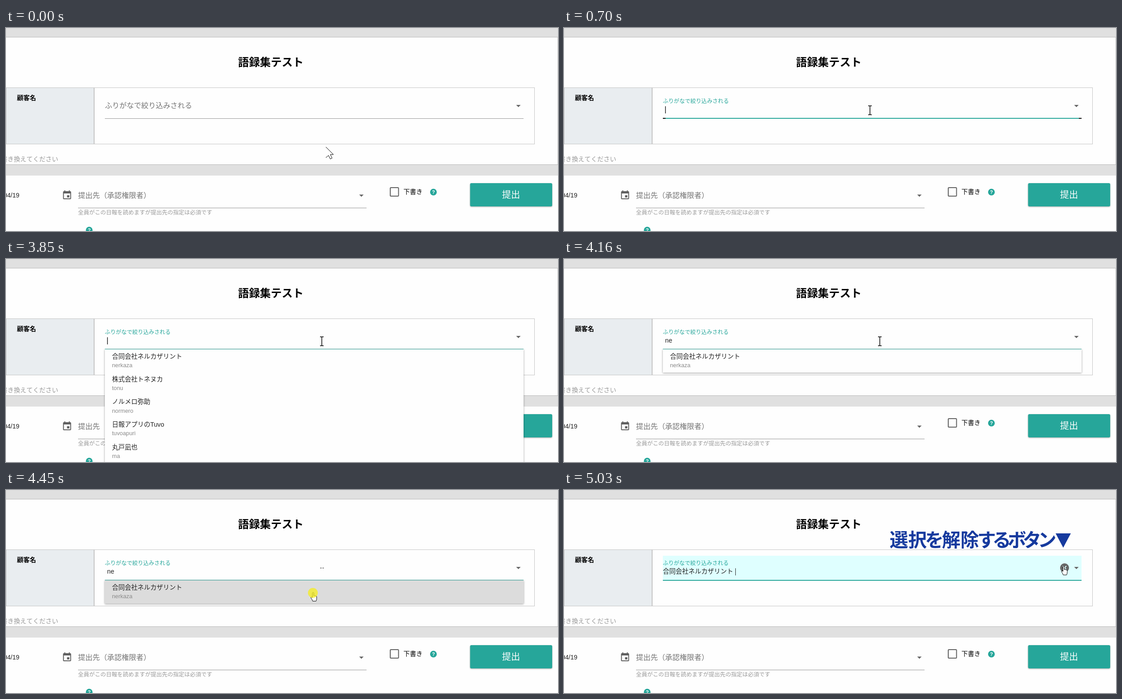
An HTML page with a canvas for the animation above (8000 ms loop, 1234x454 px).

```html
<!DOCTYPE html>
<html lang="ja">
<head>
<meta charset="utf-8">
<title>語録集テスト</title>
<style>
  html, body { margin: 0; width: 100%; height: 100%; overflow: hidden; background: #fff; }
  canvas { display: block; }
</style>
</head>
<body>
<canvas id="stage" width="1234" height="454"></canvas>
<script>
const ctx = document.getElementById('stage').getContext('2d');
const LOOP = 8000;
const TEAL = '#26a69a', BLUE = '#163a9e', GREY = '#757575', BAND = '#e0e0e0', BORDER = '#c4c4c4';
const FAMILY = '"Liberation Sans", "Noto Sans CJK JP", "Noto Sans CJK", sans-serif';
const CUSTOMER = '合同会社ネルカザリント';
const ENTRIES = [
  [CUSTOMER, 'nerkaza'],
  ['株式会社トネヌカ', 'tonu'],
  ['ノルメロ弥助', 'normero'],
  ['日報アプリのTuvo', 'tuvoapuri'],
  ['丸戸凪也', 'ma'],
];
const FIELD = { left: 221, right: 1157, top: 147, line: 202 };
const ROW = 50.75;

// The screen only refreshes at these moments.
const TICKS = [0, 80, 150, 220, 300, 370, 450, 520, 600, 680, 760, 850, 3850, 3920, 3990,
  4160, 4240, 4320, 4400, 4450, 4520, 4600, 4690, 4780, 4870, 4960, 5030];
const FOCUS = 450, MENU = 680, CAPTION = 850, CAPTION_END = 3850, TYPE = 3920, FILTER = 3990,
  MOVE = 4160, PRESS = 4400, SELECT = 4520, CLEAR = 5030;
const POINTER_PATH = [[0, 715, 266], [FOCUS, 684, 184], [3849, 684, 184], [3850, 706, 184],
  [MOVE, 706, 184], [4320, 687, 229], [4600, 686, 228], [4960, 1117, 172], [CLEAR, 1117, 170]];

const EVENT_ICON = new Path2D('M17 12h-5v5h5v-5zM16 1v2H8V1H6v2H5c-1.11 0-1.99.9-1.99 2L3 19c0 1.1.89 2 2 2h14c1.1 0 2-.9 2-2V5c0-1.1-.9-2-2-2h-1V1h-2zm3 18H5V8h14v11z');
const ARROW_FILL = new Path2D('M0 0L17 17H10L14 25L10 27L6 19L0 24Z');
const ARROW_EDGE = new Path2D('M0 0L17 17H10L14 25L10 27L6 19L0 24');
const HAND = new Path2D('M-1.5 12V1.5Q0 -1 1.5 1.5V8Q3 6.5 4 8.2Q5.5 7 6 9Q8 8 8 10.5V14Q8 17 6.5 20H-1Q-2 16 -5 12.5Q-4.5 10 -3 11Z');
const SERIFS = new Path2D('M-4 -10H-1M1 -10H4');
const IBEAM = new Path2D('M-4 -10H-1L0 -9L1 -10H4M0 -9V9M-4 10H-1L0 9L1 10H4');

const clamp = v => Math.min(1, Math.max(0, v));
const easeOut = v => 1 - (1 - clamp(v)) ** 3;
const smooth = v => v * v * (3 - 2 * v);

function rect(x, y, w, h, color) {
  ctx.fillStyle = color;
  ctx.fillRect(x, y, w, h);
}

function text(str, x, centerY, size, color, { weight = 400, align = 'left' } = {}) {
  ctx.font = `${weight} ${size}px ${FAMILY}`;
  ctx.textAlign = align;
  ctx.fillStyle = color;
  ctx.fillText(str, x, centerY + size * 0.37);
}

function polygon(color, ...points) {
  ctx.fillStyle = color;
  ctx.beginPath();
  points.forEach(([x, y]) => ctx.lineTo(x, y));
  ctx.fill();
}

function disc(x, y, r, color) {
  ctx.fillStyle = color;
  ctx.beginPath();
  ctx.arc(x, y, r, 0, Math.PI * 2);
  ctx.fill();
}

function at(x, y, draw) {
  ctx.save();
  ctx.translate(x, y);
  draw();
  ctx.restore();
}

function shadow(blur, y, alpha) {
  ctx.shadowColor = `rgba(0,0,0,${alpha})`;
  ctx.shadowBlur = blur;
  ctx.shadowOffsetY = y;
}

// Shadow around a box only, so that it does not show through a translucent one.
function outerShadow(x, y, w, h) {
  ctx.save();
  ctx.beginPath();
  ctx.rect(0, 0, 1234, 454);
  ctx.rect(x, y, w, h);
  ctx.clip('evenodd');
  shadow(4, 1, 0.4);
  rect(x, y, w, h, '#fff');
  ctx.restore();
}

const dropArrow = (x, y) => polygon('#666', [x - 5, y - 2.5], [x + 5, y - 2.5], [x, y + 2.5]);

function helpIcon(x, y) {
  disc(x, y, 7.5, TEAL);
  text('?', x, y, 11, '#fff', { weight: 700, align: 'center' });
}

// Caption lettering: kana run narrower than kanji.
function caption(str, x, y) {
  const size = 41.5;
  for (const ch of str) {
    const advance = /[ぁ-ヶ]/.test(ch) ? size * 0.815 : size;
    text(ch, x + advance / 2, y, size, BLUE, { weight: 700, align: 'center' });
    x += advance;
  }
}

function drawPage(t) {
  rect(0, 0, 1234, 454, '#fefefe');
  rect(0, 0, 1234, 20, BAND);
  rect(0, 20, 1234, 1, '#b8b8b8');
  rect(1233, 20, 1, 286, BORDER);
  text('語録集テスト', 592, 76, 24.4, '#000', { weight: 700, align: 'center' });

  rect(1, 134, 196, 125, '#e9edf0');
  rect(0, 133, 1182, 1, BORDER);
  rect(0, 259, 1182, 1, BORDER);
  rect(0, 133, 1, 127, BORDER);
  rect(196, 133, 2, 127, BORDER);
  rect(1181, 133, 1, 127, BORDER);
  text('顧客名', 24.5, 156, 14.2, '#000', { weight: 700 });
  text('書き換えてください', -11, 293, 14.2, '#999');

  rect(0, 305, 1234, 25, BAND);
  rect(0, 305, 1234, 1, '#b8b8b8');

  if (t >= FOCUS && t < 600) rect(0, 347, 160, 56, '#f2f2f2');
  text('04/19', 30, 374, 14.2, '#222', { align: 'right' });
  at(124.5, 362, () => {
    ctx.fillStyle = '#606060';
    ctx.fill(EVENT_ICON);
  });
  text('提出先（承認権限者）', 161, 374, 16.25, GREY);
  dropArrow(794.5, 375);
  rect(161, 402, 645, 1, '#949494');
  text('全員がこの日報を読めますが提出先の指定は必須です', 161, 412, 12.5, '#999');
  helpIcon(186, 452);

  ctx.strokeStyle = '#606060';
  ctx.lineWidth = 2;
  ctx.beginPath();
  ctx.roundRect(859, 357, 18.5, 19, 1.5);
  ctx.stroke();
  text('下書き', 888.5, 366, 14.2, '#000');
  helpIcon(955.5, 367);

  ctx.save();
  shadow(3, 1, 0.35);
  ctx.fillStyle = TEAL;
  ctx.beginPath();
  ctx.roundRect(1037.5, 347, 183.5, 52, 3);
  ctx.fill();
  ctx.restore();
  text('提出', 1129, 372, 20.3, '#fff', { align: 'center' });
}

function drawField(t, pointer, typed) {
  const { left, right, top, line } = FIELD;
  const width = right - left;
  const focus = easeOut((t - FOCUS) / 300);
  const selected = t >= SELECT;

  if (selected) {
    if (t < CLEAR) {
      for (const x of [216, right]) rect(x, top, 5, 28, '#f0f0f0');
      for (const x of [216, 1162]) rect(x, top, 1, 112, '#ededed');
    }
    rect(left, top, width, line - top, '#dfffff');
  }

  const hovered = pointer.y > top && pointer.y < line;
  if (t >= FOCUS || hovered) rect(left, line - 1, width, 2, '#000');
  else rect(left, line, width, 1, '#949494');
  rect(left + width / 2 * (1 - focus), line - 1, width * focus, 2, TEAL);

  text('ふりがなで絞り込みされる', left, 173 - 10 * focus, 16.25 - 4 * focus, t < FOCUS ? GREY : TEAL);
  dropArrow(1145.5, 174.5);

  if (selected) {
    text(CUSTOMER, left, 182, 14.3, '#222');
    disc(1119, 174, 10, t < CLEAR ? '#999' : '#666');
    ctx.strokeStyle = '#dfffff';
    ctx.lineWidth = 2;
    ctx.stroke(new Path2D('M1115 170l8 8m0 -8l-8 8'));
  } else {
    text(typed, 226, 182, 14.3, '#222');
  }

  if (t >= CLEAR) rect(383, 175, 1, 16, '#222');
  else if (t > FOCUS && t < MOVE) rect(226 + typed.length * 8, 175, 1.5, 16, '#222');
}

function drawMenu(t, typed, pointer) {
  if (t <= MENU || t >= SELECT) return;
  const { left, right, line } = FIELD;
  const items = ENTRIES.filter(([, reading]) => reading.includes(typed));
  const height = typed ? Math.round(items.length * ROW) + 1 : 300;
  const hovered = t >= MOVE && pointer.y > line;

  ctx.save();
  ctx.globalAlpha = t < CAPTION ? 0.5 : t < CAPTION_END ? 0.88 : 1;
  outerShadow(left, line, right - left, height);
  rect(left, line, right - left, height, hovered ? '#dcdcdc' : '#fefefe');
  items.forEach(([name, reading], i) => {
    text(name, 237, 217.5 + i * ROW, 14.25, '#222');
    text(reading, 237, 237.5 + i * ROW, 12.8, '#8a8a8a');
  });
  ctx.restore();
}

function drawCaptions(t) {
  if (t >= CAPTION && t < CAPTION_END) {
    for (const [str, y] of [['入力で絞り込み', 175], ['語録一覧', 231.5]]) {
      polygon(BLUE, [445.5, y], [477.5, y - 17], [477.5, y + 17]);
      caption(str, 482, y);
    }
  }
  if (t >= CLEAR) {
    caption('選択を解除するボタン', 728, 112);
    polygon(BLUE, [1099, 97], [1133, 97], [1116, 129]);
  }
}

function pointerAt(t) {
  const next = POINTER_PATH.findIndex(([time]) => time > t);
  if (next < 0) {
    const [, x, y] = POINTER_PATH.at(-1);
    return { x, y };
  }
  const [t0, x0, y0] = POINTER_PATH[next - 1], [t1, x1, y1] = POINTER_PATH[next];
  const p = smooth((t - t0) / (t1 - t0));
  return { x: x0 + (x1 - x0) * p, y: y0 + (y1 - y0) * p };
}

function drawPointer(t, { x, y }) {
  const inField = y < FIELD.line;
  const overItem = t >= MOVE && t < SELECT && !inField;
  ctx.strokeStyle = '#000';
  ctx.fillStyle = '#fff';
  ctx.lineWidth = 1;

  if (t > MOVE && t < SELECT) at(706.5, 184.5, () => ctx.stroke(SERIFS));
  at(x, y, () => {
    if (overItem || x > 1108) {
      ctx.fill(HAND);
      ctx.stroke(HAND);
    } else if (inField) {
      ctx.lineWidth = 1.5;
      ctx.stroke(IBEAM);
    } else {
      ctx.fill(ARROW_FILL);
      ctx.stroke(ARROW_EDGE);
    }
  });

  // The click mark tints the hand beneath it.
  if (t >= PRESS && t < SELECT) {
    ctx.save();
    ctx.globalAlpha = 0.75;
    disc(686, 230, 11, '#f6ee1e');
    ctx.restore();
  }
}

function render(time) {
  const now = time % LOOP;
  const t = TICKS.filter(tick => tick <= now).pop();
  const pointer = pointerAt(t);
  const typed = t < TYPE ? '' : t < FILTER ? 'n' : 'ne';
  drawPage(t);
  drawField(t, pointer, typed);
  drawMenu(t, typed, pointer);
  drawCaptions(t);
  drawPointer(t, pointer);
}

let start;
function loop(time) {
  start ??= time;
  render(Math.max(0, time - start));
  requestAnimationFrame(loop);
}
render(0);
requestAnimationFrame(loop);
</script>
</body>
</html>
```
